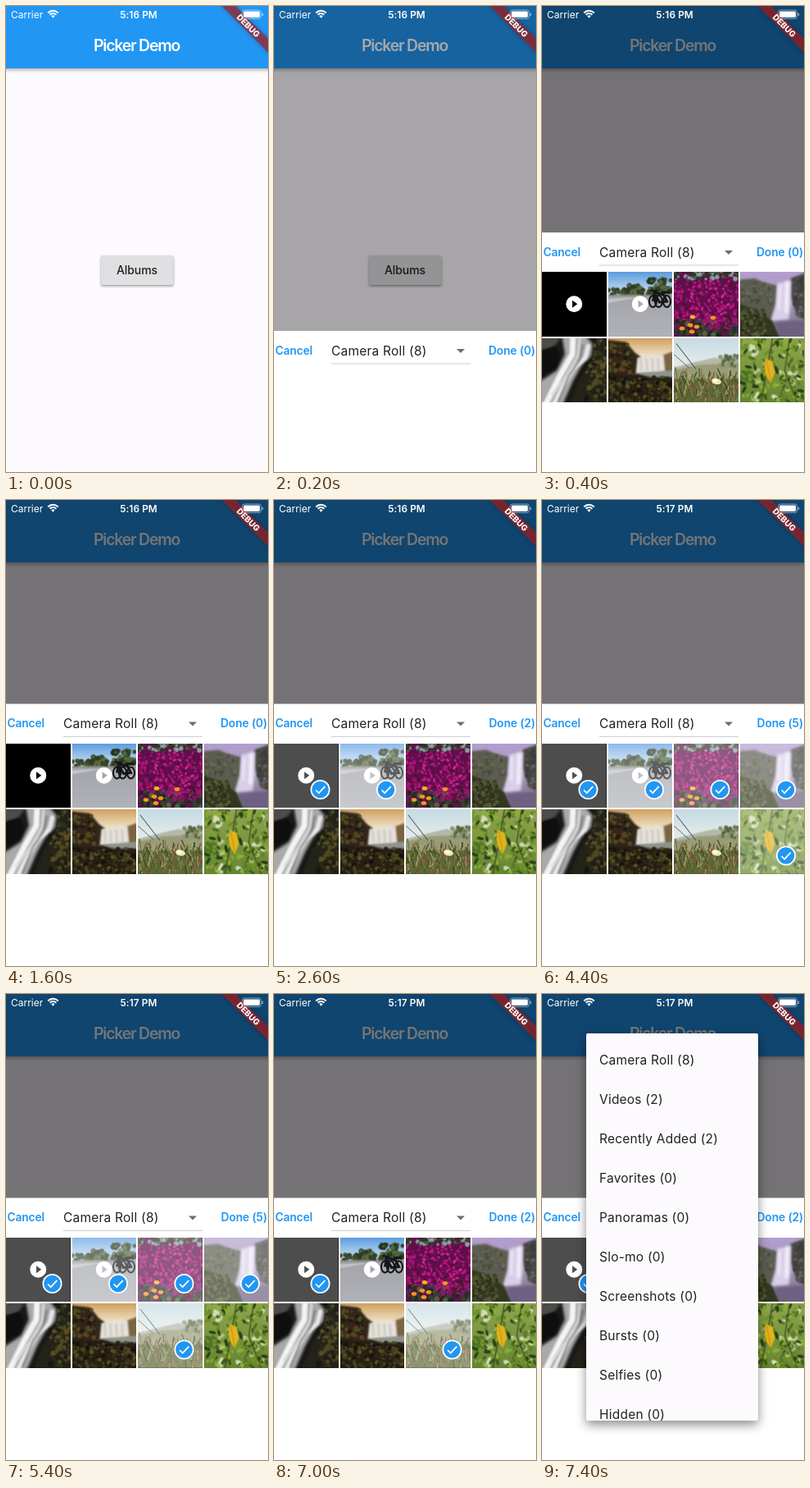
An HTML page with a canvas that plays this animation: 320 px wide and 568 px high, repeating every 8 s.

```html
<!DOCTYPE html>
<html lang="en">
<head>
<meta charset="utf-8">
<title>Picker Demo</title>
<style>
  html, body { margin: 0; width: 100%; height: 100%; overflow: hidden; background: #fdfafe; }
  canvas { display: block; width: 320px; height: 568px; }
</style>
</head>
<body>
<canvas id="stage"></canvas>
<script>
const W = 320, H = 568, LOOP = 8000;
const BLUE = '#2196f3', PAPER = '#fdfafe', INK = '#212121';
const TILE = 78.5, STRIDE = 80.5;

const canvas = document.getElementById('stage');
const dpr = window.devicePixelRatio || 1;
const photoScale = dpr * 2;
canvas.width = W * dpr;
canvas.height = H * dpr;
const stage = canvas.getContext('2d');
stage.scale(dpr, dpr);
let g = stage;

// Each step holds until the next one.
const steps = [
  { at: 0, top: H, scrim: 0, picked: '' },
  { at: 200, top: 396, scrim: 0.34, picked: '' },
  { at: 400, top: 276, picked: '' },
  { at: 1600, picked: '' },
  { at: 2200, picked: '0' },
  { at: 2600, picked: '01' },
  { at: 3000, picked: '012' },
  { at: 3400, picked: '0123' },
  { at: 4000, picked: '01237' },
  { at: 4400, picked: '01237' },
  { at: 5000, picked: '0123' },
  { at: 5400, picked: '01236' },
  { at: 5800, picked: '0126' },
  { at: 6200, picked: '016' },
  { at: 7000, picked: '06' },
  { at: 7200, picked: '06', menu: 0.75 },
  { at: 7400, picked: '06', menu: 1 }
];

const albums = ['Camera Roll (8)', 'Videos (2)', 'Recently Added (2)', 'Favorites (0)',
  'Panoramas (0)', 'Slo-mo (0)', 'Screenshots (0)', 'Bursts (0)', 'Selfies (0)', 'Hidden (0)'];

function rect(color, x, y, w, h) {
  g.fillStyle = color;
  g.fillRect(x, y, w, h);
}

function round(color, x, y, w, h, r) {
  g.fillStyle = color;
  g.beginPath();
  g.roundRect(x, y, w, h, r);
  g.fill();
}

function disc(color, x, y, rx, ry = rx, turn = 0) {
  g.fillStyle = color;
  g.beginPath();
  g.ellipse(x, y, rx, ry, turn, 0, 7);
  g.fill();
}

function trace(points) {
  g.beginPath();
  for (let i = 0; i < points.length; i += 2) g.lineTo(points[i], points[i + 1]);
}

function poly(color, ...points) {
  g.fillStyle = color;
  trace(points);
  g.fill();
}

function line(color, width, ...points) {
  g.strokeStyle = color;
  g.lineWidth = width;
  trace(points);
  g.stroke();
}

function fade(y0, y1, ...colors) {
  const f = g.createLinearGradient(0, y0, 0, y1);
  colors.forEach((c, i) => f.addColorStop(i / (colors.length - 1), c));
  return f;
}

function text(str, x, y, size, weight, color, align = 'left', spacing = 0) {
  g.font = `${weight} ${size}px Inter, Roboto, sans-serif`;
  g.letterSpacing = spacing + 'px';
  g.textAlign = align;
  g.fillStyle = color;
  g.fillText(str, x, y);
}

function albumName(name, y) {
  text(name, 70, y, 15.5, 400, INK, 'left', 0.22);
}

function shadow(color, blur, dy) {
  g.shadowColor = color;
  g.shadowBlur = blur * dpr;
  g.shadowOffsetY = dy * dpr;
}

// Blurs everything painted on a photo until the next call.
function soften(radius) {
  g.filter = radius ? `blur(${radius * photoScale}px)` : 'none';
}

function random(seed) {
  return () => (seed = (seed * 16807) % 2147483647) / 2147483647;
}

// Scatters small blobs over a box to suggest foliage or rock.
function scatter(seed, count, x, y, w, h, size, colors, stretch = 1) {
  const rnd = random(seed);
  for (let i = 0; i < count; i++) {
    const r = size * (0.5 + rnd());
    const px = x + rnd() * w, py = y + rnd() * h, turn = rnd() * 3;
    disc(colors[Math.floor(rnd() * colors.length)], px, py, r, r * stretch, turn);
  }
}

const photos = [
  function night() {
    rect('#000', 0, 0, TILE, TILE);
  },

  function road() {
    rect(fade(0, 22, '#5b9be0', '#b9d6f0'), 0, 0, TILE, 32);
    soften(0.5);
    scatter(11, 60, 0, 21, 52, 7, 2, ['#3b4a2c', '#56643e', '#2c3823']);
    scatter(13, 35, 22, 16, 20, 10, 2.2, ['#42532f', '#5d6c44', '#2f3c25']);
    scatter(12, 70, 50, 8, 28, 19, 2.4, ['#35482a', '#586b40', '#27341f']);
    rect('#8b8b83', 0, 28, TILE, 3);
    rect(fade(30, TILE, '#a3a5ab', '#b0b2b8'), -2, 30, TILE + 4, 52);
    poly('#c1c3c7', 0, 33, 38, 31, 0, 38);
    soften(0.2);
    g.strokeStyle = '#15161a';
    g.lineWidth = 2;
    for (const x of [55, 62, 72]) {
      g.beginPath();
      g.ellipse(x, 36, 4.5, 7, 0, 0, 7);
      g.stroke();
    }
    line('#15161a', 3, 55, 36, 57, 25, 68, 28, 72, 36, 63, 37, 58, 28);
    line('#15161a', 2, 52, 23, 61, 23);
    line('#15161a', 3, 65, 25, 75, 25);
  },

  function flowers() {
    rect('#5f1049', 0, 0, TILE, TILE);
    soften(0.4);
    scatter(21, 80, 0, -1, TILE, 10, 2, ['#2c3f25', '#4d6040', '#8ba3a5', '#26381f']);
    scatter(22, 330, 0, 11, TILE, 50, 1.7, ['#d4148f', '#e62ba8', '#8a1261', '#c01886', '#4a0d3a'], 0.6);
    scatter(23, 120, 0, 58, TILE, 22, 2.2, ['#25331d', '#33442a', '#1b2616', '#53663a', '#47325a']);
    scatter(24, 70, 36, 54, 42, 17, 1.7, ['#c91f8e', '#8e1867', '#a3166f'], 0.6);
    soften(0.2);
    for (const [x, y] of [[23, 55], [20, 65], [28, 67], [10, 69], [22, 73], [48, 56]])
      disc(x % 2 ? '#f5b51b' : '#f0981d', x, y, 3.4, 2.4);
  },

  function falls() {
    rect(fade(0, TILE, '#b39ecf', '#a99bb9', '#6c607c'), 0, 0, TILE, TILE);
    soften(1.2);
    poly('#5b5d50', -4, 10, 18, 8, 30, 13, 46, 17, 44, 40, 38, 60, -4, 72);
    poly('#44453f', 62, 8, 84, 0, 84, 60, 70, 54, 62, 30);
    soften(0.8);
    scatter(32, 75, 0, 14, 40, 26, 1.6, ['#667048', '#454b34', '#59523f', '#6b6670']);
    scatter(33, 35, 66, 8, 14, 46, 1.6, ['#585a4d', '#3c3a3c', '#6b6470']);
    soften(1.6);
    poly('#d9cfe8', 46, 14, 63, 10, 62, 40, 60, 58, 38, 60, 44, 40);
    line('#f6f2fc', 4, 58, 12, 57, 50);
    line('#eee8f7', 3, 49, 16, 48, 46);
    poly('#6d6080', 42, 62, 84, 58, 84, 84, 55, 84);
    soften(1);
    poly('#33371f', -4, 38, 20, 46, 40, 60, 50, 84, -4, 84);
    soften(0.5);
    scatter(31, 100, 0, 46, 32, 34, 1.7, ['#464c2a', '#292d1b', '#575a36']);
  },

  function stream() {
    rect('#191916', 0, 0, TILE, TILE);
    soften(1.6);
    poly('#4e4b48', -4, -4, 26, -4, 14, 12, -4, 18);
    poly('#a9a9aa', 24, -4, 52, -4, 62, 8, 60, 22, 48, 34, 38, 52, 24, 84, -4, 84, -4, 54, 18, 40, 28, 20);
    soften(1.1);
    line('#f4f4f5', 7, 38, -3, 37, 20, 22, 46, 4, 82);
    line('#e9e9eb', 5, 57, 8, 53, 24, 38, 38, 26, 58, 14, 82);
    line('#dadadc', 3, 46, 0, 44, 22, 30, 46, 12, 70);
    line('#6d6d6d', 1.6, 50, 8, 46, 27, 33, 46, 20, 78);
    poly('#0f0f0f', -4, 16, 16, 10, 22, 22, 18, 36, -4, 48);
    poly('#24231a', 66, -4, 84, -4, 84, 84, 32, 84, 46, 50, 62, 28);
    soften(0.7);
    scatter(41, 110, 54, 28, 25, 50, 2, ['#4d4a20', '#302d19', '#5c5226', '#171712']);
    scatter(42, 35, 62, 0, 17, 26, 1.8, ['#55552f', '#33321f', '#20201a']);
  },

  function rocks() {
    rect(fade(0, 44, '#cfa060', '#efe1c4', '#a8a89e'), 0, 0, TILE, TILE);
    soften(1);
    poly('#33261a', -4, 2, 22, 5, 33, 18, 40, 23, 38, 44, -4, 48);
    poly('#7a6543', 64, 22, 84, 15, 84, 42, 66, 42);
    poly('#e6e1da', 36, 24, 68, 20, 70, 42, 34, 44);
    for (let x = 40; x < 68; x += 7) line('#bdb8b0', 1.4, x, 25, x + 1, 40);
    rect('#241e14', -4, 44, TILE + 8, 40);
    poly('#8e938d', 36, 43, 84, 39, 84, 48, 50, 48);
    soften(0.6);
    scatter(51, 190, 0, 47, TILE, 32, 2, ['#14120d', '#3d341a', '#5e5022', '#2a2216', '#484721']);
    scatter(52, 55, 0, 8, 28, 34, 1.9, ['#5c4320', '#1f1911', '#4c4d22']);
  },

  function dunes() {
    rect(fade(0, 38, '#c5dbe3', '#e9eeeb'), 0, 0, TILE, TILE);
    soften(0.8);
    poly('#b3b8a8', 28, 29, 50, 24, 62, 28, 84, 20, 84, 50, -4, 50, -4, 37);
    poly('#989b76', -4, 40, 30, 33, 84, 31, 84, 84, -4, 84);
    scatter(62, 40, 56, 21, 24, 14, 2, ['#6e7a52', '#8b9470', '#56633f']);
    rect('#5d6836', -4, 50, TILE + 8, 36);
    soften(0.35);
    const rnd = random(61);
    const blades = ['#75854a', '#4b5b29', '#8f6c50', '#84493a', '#a0aa74', '#38471f'];
    for (let i = 0; i < 190; i++) {
      const x = rnd() * TILE, y = 46 + rnd() * 34;
      line(blades[i % 6], 1.2, x, y, x + rnd() * 8 - 4, y - 4 - rnd() * 7);
    }
    line('#424b50', 0.9, 3, 7, 27, 38);
    line('#525c60', 0.7, 0, 20, 19, 37);
    disc('#eeebac', 52, 53, 6, 3.6, 0.2);
    disc('#fffde0', 51, 52, 3, 2);
  },

  function leaves() {
    rect(fade(0, TILE, '#90a64e', '#668530'), 0, 0, TILE, TILE);
    soften(0.8);
    scatter(71, 60, 0, 0, TILE, TILE, 3.6, ['#b3c486', '#7f9f39', '#d3dcb8', '#5d7d2a'], 0.6);
    soften(0.4);
    scatter(72, 150, 0, 0, TILE, TILE, 3.6, ['#37571d', '#4e7422', '#6d922a', '#273f18', '#8db035'], 0.4);
    line('#3c3a1e', 1.2, 40, 0, 36, 24, 26, TILE);
    line('#3c3a1e', 1, 61, 0, 55, 40, 70, TILE);
    poly('#e3b31d', 32, 25, 40, 29, 43, 42, 38, 55, 32, 46, 30, 35);
    line('#c18e14', 0.9, 33, 27, 38, 53);
  }
];

function playIcon(x, y) {
  g.fillStyle = '#fff';
  g.beginPath();
  g.arc(x, y, 10, 0, 7);
  g.closePath();
  g.moveTo(x - 2.2, y - 4.5);
  g.lineTo(x + 4, y);
  g.lineTo(x - 2.2, y + 4.5);
  g.closePath();
  g.fill('evenodd');
}

function checkIcon(x, y) {
  disc('#fff', x, y, 12);
  disc(BLUE, x, y, 10.3);
  line('#fff', 1.7, x - 5.5, y + 0.5, x - 1.8, y + 4.2, x + 5.8, y - 3.9);
}

// Photos are painted once and then reused.
const thumbs = photos.map(paint => {
  const c = document.createElement('canvas');
  c.width = c.height = TILE * photoScale;
  g = c.getContext('2d');
  g.scale(photoScale, photoScale);
  paint();
  return c;
});
g = stage;

function page() {
  rect(PAPER, 0, 0, W, H);
  g.save();
  shadow('rgba(0,0,0,.36)', 5, 1.5);
  rect(BLUE, -8, -8, W + 16, 84);
  g.restore();
  text('Picker Demo', 159.5, 55, 19.4, 600, '#fff', 'center', -1.2);
  g.save();
  shadow('rgba(0,0,0,.4)', 3, 1.5);
  round('#e0dfe1', 116, 304, 88.5, 36, 2);
  g.restore();
  text('Albums', 160, 326.8, 14, 500, INK, 'center', -0.1);
}

function tile(i, top, picked) {
  const x = (i % 4) * STRIDE, y = top + 48 + Math.floor(i / 4) * STRIDE;
  g.drawImage(thumbs[i], x, y, TILE, TILE);
  if (picked) rect('rgba(255,255,255,.3)', x, y, TILE, TILE);
  if (i < 2) playIcon(x + 39.25, y + 39.25);
  if (picked) checkIcon(x + 56.5, y + 56.5);
}

function sheet(top, picked) {
  rect('#fff', 0, top, W, H - top);
  text('Cancel', 1.5, top + 28.9, 13.8, 600, BLUE, 'left', -0.15);
  albumName(albums[0], top + 29.6);
  text(`Done (${picked.length})`, 319, top + 28.9, 13.8, 600, BLUE, 'right', -0.1);
  rect('#cfcdd0', 70, top + 39.5, 170, 1);
  poly('#6f6d70', 223, top + 22, 233, top + 22, 228, top + 27);
  if (top < 300) photos.forEach((_, i) => tile(i, top, picked.includes(i)));
}

function menu(progress) {
  g.save();
  shadow('rgba(0,0,0,.45)', 13, 5);
  round(PAPER, 54, 48, 210, 472, 2);
  g.restore();
  g.save();
  g.beginPath();
  g.rect(54, 48, 210, 472);
  g.clip();
  const unit = 0.5 / (albums.length + 1.5);
  albums.forEach((name, i) => {
    const start = 0.5 + i * unit;
    g.globalAlpha = Math.min(1, Math.max(0, (progress - start) / (1.5 * unit)));
    albumName(name, 85.6 + i * 48);
  });
  g.restore();
}

function banner() {
  g.save();
  g.translate(W, 0);
  g.rotate(Math.PI / 4);
  g.save();
  shadow('rgba(0,0,0,.4)', 5, 0);
  rect('rgba(183,28,28,.63)', -42, 28, 84, 12);
  g.restore();
  text('DEBUG', 0, 37.6, 10, 800, '#fff', 'center');
  g.restore();
}

function statusBar(clock) {
  text('Carrier', 6, 14.8, 12, 400, '#fff');
  g.strokeStyle = '#fff';
  g.lineWidth = 2;
  for (const r of [8.6, 5.3]) {
    g.beginPath();
    g.arc(57.5, 14.4, r, -Math.PI * 0.76, -Math.PI * 0.24);
    g.stroke();
  }
  g.fillStyle = '#fff';
  g.beginPath();
  g.moveTo(57.5, 14.8);
  g.arc(57.5, 14.4, 3, -Math.PI * 0.76, -Math.PI * 0.24);
  g.fill();
  text(clock, 162, 14.6, 11.8, 600, '#fff', 'center', 0.1);
  g.strokeStyle = 'rgba(255,255,255,.5)';
  g.lineWidth = 1;
  g.beginPath();
  g.roundRect(288.5, 5, 23, 10.5, 2.6);
  g.stroke();
  round('#fff', 290, 6.5, 20, 7.5, 1.4);
  round('rgba(255,255,255,.6)', 312.7, 8.4, 1.4, 3.8, 0.7);
}

function draw({ at, top = H - W, scrim = 0.54, picked, menu: opening = 0 }) {
  page();
  rect(`rgba(0,0,0,${scrim})`, 0, 0, W, H);
  if (top < H) sheet(top, picked);
  if (opening) menu(opening);
  banner();
  statusBar(at < 4400 ? '5:16 PM' : '5:17 PM');
}

// An open sheet covers nine sixteenths of the screen.
steps.forEach(s => { s.top ??= H - H * 9 / 16; });

let shown;
const begin = performance.now();

function tick() {
  const t = (performance.now() - begin) % LOOP;
  const step = steps.findLast(s => s.at <= t);
  if (step !== shown) draw(shown = step);
  requestAnimationFrame(tick);
}
tick();
</script>
</body>
</html>
```
